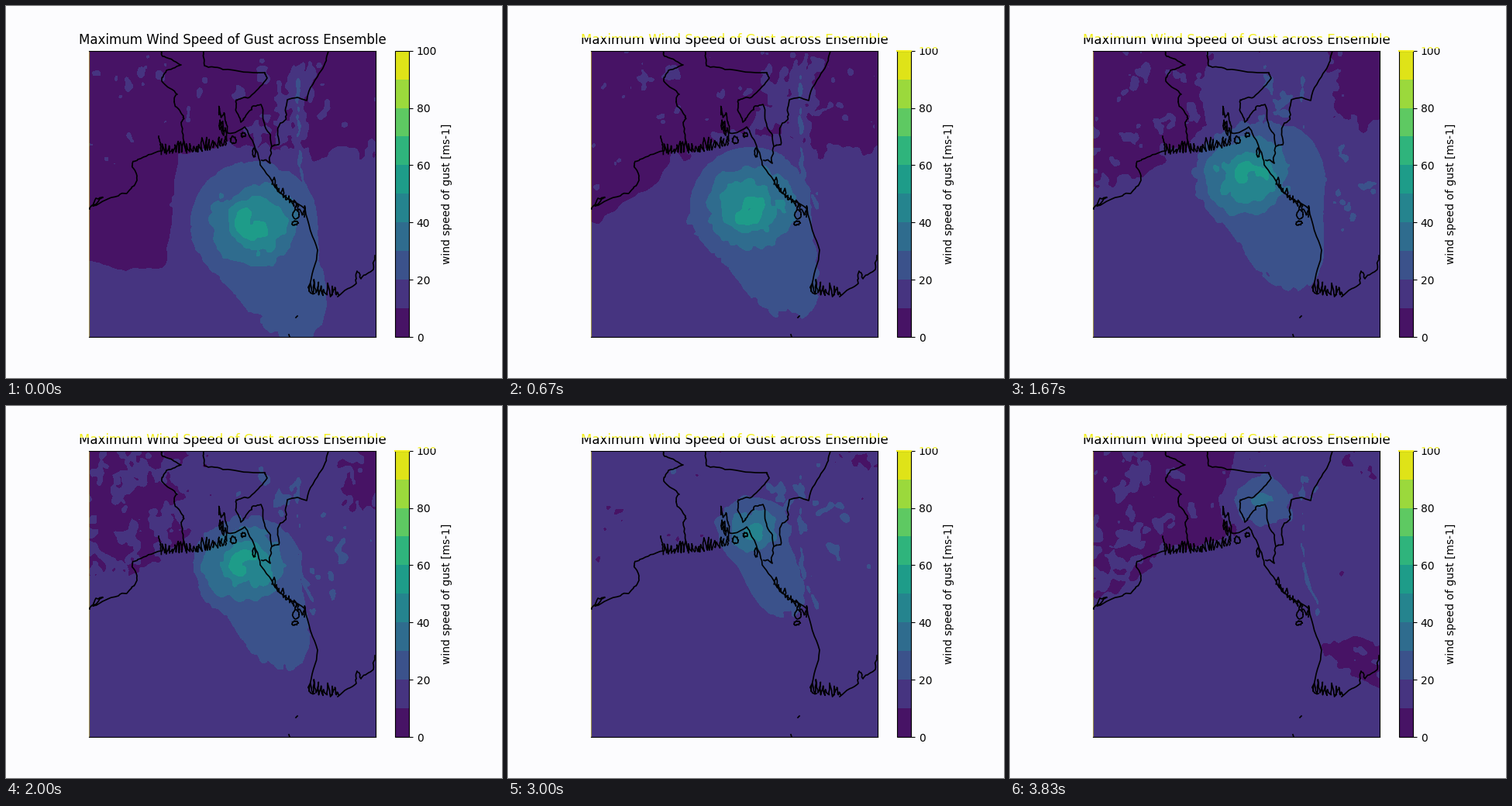
Animation, 640 px wide and 480 px high, one loop 3990 ms. Source, as a matplotlib script:

```python
import numpy as np
import matplotlib.pyplot as plt
from matplotlib.animation import FuncAnimation
from matplotlib.cm import ScalarMappable
from matplotlib.colors import BoundaryNorm, ListedColormap
from matplotlib.patches import Rectangle
from matplotlib.transforms import Bbox

W, H, FRAMES, LOOP_MS = 640, 480, 24, 3990
PAPER, YELLOW = "#fcfcfe", "#f2ee20"
LEFT, RIGHT, TOP, BOTTOM = 107.2, 476.8, 57.6, 427.2
TITLE = "Maximum Wind Speed of Gust across Ensemble"
LEVELS = np.arange(0, 101, 10)
CMAP = ListedColormap(plt.get_cmap("viridis")(np.linspace(.05, .95, 10)))
NORM = BoundaryNorm(LEVELS, 10)
rng = np.random.default_rng(14)

# Map coordinates are stage pixels, y pointing down.
N = 247
X, Y = np.meshgrid(np.linspace(LEFT, RIGHT, N), np.linspace(TOP, BOTTOM, N))


def smooth_noise(sx, sy):
    fx, fy = np.meshgrid(np.fft.fftfreq(N), np.fft.fftfreq(N))
    kernel = np.exp(-2 * np.pi**2 * ((fx * sx)**2 + (fy * sy)**2))
    field = np.fft.ifft2(np.fft.fft2(rng.normal(size=(N, N))) * kernel).real
    return field / field.std()


def step(v):
    return 1 / (1 + np.exp(-np.clip(v, -40, 40)))


def bump(cx, cy, rx, ry):
    return np.exp(-((X - cx) / rx)**2 - ((Y - cy) / ry)**2)


WARP = 5 * smooth_noise(5, 5)
TERRAIN = .6 * smooth_noise(2, 3) + .7 * smooth_noise(5, 6)
GUSTS = [.7 * smooth_noise(1.8, 1.8) + .6 * smooth_noise(4, 4) for _ in range(2)]

COAST_Y = np.interp(X, [108, 165, 205, 300, 320, 390, 402, 478],
                    [258, 225, 190, 165, 200, 265, 320, 370])
LAND = step((COAST_Y - Y) / 6)
RIDGE = X - 376 - 30 * ((Y - 160) / 130)**2 * np.where(Y < 160, .5, 1) + .6 * WARP
RIDGE_SPAN = step((Y - 75) / 8) * step((298 - Y) / 8)


def calm_air(k):
    """Share of still air: a retreating northern front, then a lull over land."""
    early = min(k, 4)
    front = (192 + 148 * np.exp(-k / 9) * step((215 - 10 * early - X) / (3 + 5 * early))
             - 10 * max(k - 6, 0) * (X > 400))
    gap = step((13 * max(k - 4, 0) - np.abs(X + WARP - 333)) / 6) * step((k - 5) * 3)
    northern = .87 * step((front - Y + WARP) / 4) * (1 - gap) * step((13 - k) / 1.2)
    lull = (.62 + .25 * step((X - 185) / 8)) * LAND * step((k - 20.5) / .7)
    lull = lull * (step((292 - X + WARP) / 5) + step((Y - 308 + WARP) / 5))
    pool = 1.1 * bump(197, 230, 31, 29) * np.exp(-((k - 15) / 1.5)**2)
    corner = .58 * bump(448, 72, 34, 28) * step((k - 10) / 2)
    return np.maximum.reduce([northern, lull, pool, corner])


def wind(k):
    u = k / (FRAMES - 1)
    cx = 320 - 14 * np.sin(np.pi * k / 20)
    cy = 282 - 5.5 * k - .065 * k**2
    turn = .45 * k
    noise = .8 * TERRAIN + .7 * (np.cos(turn) * GUSTS[0] + np.sin(turn) * GUSTS[1])

    ridge = RIDGE_SPAN * np.exp(-(RIDGE / 6)**2)
    halo = RIDGE_SPAN * np.exp(-(RIDGE / 18)**2)
    gusty = (.52 * bump(420 + WARP, cy + 5, 58, 65) * np.exp(-((k - 13) / 11)**2)
             + .4 * bump(350 + WARP, 115, 36, 38) * step((k - 2) / 1.5))
    base = 14 - 8 * calm_air(k) * (1 - .7 * halo) + 12 * gusty
    base = np.maximum(base, 14.5 * ridge + 6) + noise * (.35 + 1.4 * LAND)

    dx, dy = X - cx, Y - cy
    angle, dist = np.arctan2(dy, dx), np.hypot(dx / 1.08, dy)
    tail = np.exp(-((angle - np.radians(65)) / .5)**2) * step((20.5 - k) / .7)
    east = np.exp(-((k - 9) / 3)**2) * np.maximum(np.cos(angle), 0)
    reach = 82 - 52 * u**1.3 + 82 * tail + 40 * east
    rho = np.hypot(dx, dy) / reach + .05 * noise
    outer = np.where(rho < 1, 20 + np.minimum(16 * (1 - rho), 5), 20 - 40 * (rho - 1))
    outer += .9 * noise * (rho < 1)

    # The core weakens linearly outward and dies away after landfall.
    peak = 33 + 27 * step((17.5 - k) / 1.8)
    radius = 53 * step((18 - k) / 3)
    core = peak - (peak - 30) * dist / radius
    swirl = np.cos(angle - dist / 6 + .4 * k) * np.exp(-(dist / 36)**2)
    core += (peak - 33) / 27 * (4.5 * swirl - 7 * np.exp(-(dist / 7)**2)) + 1.6 * noise
    return np.clip(np.maximum.reduce([base, outer, core]), 1, 99)


def rough(points, amount=1.6, rounds=3):
    """Subdivide a sketch line, jittering each new point."""
    pts = np.array(points, float)
    for _ in range(rounds):
        mid = (pts[1:] + pts[:-1]) / 2 + rng.normal(0, amount, (len(pts) - 1, 2))
        out = np.empty((len(pts) + len(mid), 2))
        out[::2], out[1::2] = pts, mid
        pts, amount = out, amount / 2
    return pts


def inlets(start, end, count, depth, sag=0):
    """Zigzag of narrow river mouths rising from a base line."""
    s = np.linspace(0, 1, count)
    pts = np.outer(1 - s, start) + np.outer(s, end)
    pts[:, 1] += sag * np.sin(np.pi * s)
    pts += rng.uniform(-1.5, 1.5, pts.shape)
    pts[1::2, 1] -= rng.uniform(.3, 1, len(pts[1::2])) * depth
    return rough(pts, .9, 2)


def island(x, y, rx, ry):
    a = np.linspace(0, 2 * np.pi, 8)
    return rough(np.c_[x + rx * np.cos(a), y + ry * np.sin(a)], .7, 2)


fig = plt.figure(figsize=(W / 100, H / 100), dpi=100, facecolor=PAPER)


def axes_at(x0, x1):
    return fig.add_axes([x0 / W, 1 - BOTTOM / H, (x1 - x0) / W, (BOTTOM - TOP) / H])


ax = axes_at(LEFT, RIGHT)
ax.set(xlim=(LEFT, RIGHT), ylim=(BOTTOM, TOP), xticks=[], yticks=[])
ax.set_title(TITLE)
ax.spines["left"].set(color=YELLOW, alpha=.5)
bar = fig.colorbar(ScalarMappable(NORM, CMAP), cax=axes_at(501.6, 520.08),
                   ticks=range(0, 101, 20), label="wind speed of gust [ms-1]")
bar.minorticks_off()

western_border = [(201, 58), (204, 65), (226, 76), (207, 83), (201, 97), (221, 114),
                  (217, 124), (229, 142), (226, 150), (232, 187)]
northern_border = [(255, 58), (256, 77), (280, 82), (334, 86), (337, 93), (318, 114),
                   (302, 120), (297, 128), (303, 150), (316, 134), (329, 127),
                   (334, 155), (343, 181), (341, 203), (330, 199)]
eastern_border = [(343, 181), (352, 179), (354, 151), (362, 140), (363, 121),
                  (388, 122), (407, 83), (416, 58)]
western_coast = [(108, 262), (116, 248), (125, 247), (112, 258), (145, 245),
                 (162, 235), (169, 225), (163, 208), (170, 198), (200, 187), (197, 168)]
eastern_coast = [(284, 150), (286, 164), (308, 156), (319, 176), (328, 205), (352, 240),
                 (386, 262), (402, 315), (391, 366), (398, 371)]
southern_coast = [(428, 375), (452, 358), (453, 342), (458, 352), (474, 340), (476, 322)]

lines = [rough(p) for p in (western_border, northern_border, eastern_border,
                            western_coast, eastern_coast, southern_coast)]
lines += [
    inlets((200, 190), (284, 180), 43, 16, sag=3),
    inlets((275, 153), (284, 173), 9, 20),
    inlets((274, 140), (282, 150), 5, 12),
    inlets((343, 231), (386, 272), 23, 11),
    inlets((392, 368), (430, 374), 19, 17, sag=2),
    island(374, 269, 4, 6), island(373, 280, 4, 3), island(306, 166, 3, 3),
    island(320, 189, 2, 6), island(293, 173, 4, 5),
    np.array([(374, 402), (376, 400)]), np.array([(365, 424), (366, 427)]),
]
for line in lines:
    ax.plot(*line.T, color="black", lw=1.2, zorder=3)


def strip(x0, y0, x1, y1, color):
    return fig.add_artist(Rectangle((x0 / W, 1 - y1 / H), (x1 - x0) / W, (y1 - y0) / H,
                                    transform=fig.transFigure, color=color, lw=0, zorder=8))


def yellow_top(x, y, text, box, **style):
    """Yellow upper part of a label, with paper colour behind it."""
    x0, y0, x1, y1 = box
    label = fig.text(x / W, 1 - y / H, text, color=YELLOW, zorder=9, **style)
    label.set_clip_box(Bbox.from_extents(x0, H - y1, x1, H - y0))
    label.set_clip_on(True)
    return [strip(*box, PAPER), label]


POINT = 100 / 72
tinted = [strip(501, 57, 521, 58.5, YELLOW)]
tinted += yellow_top((LEFT + RIGHT) / 2, TOP - 6 * POINT, TITLE, (90, 33, 495, 41),
                     size=12, ha="center", va="baseline")
tinted += yellow_top(520.08 + 7 * POINT, TOP, "100", (527, 50, 558, 55),
                     size=10, ha="left", va="center_baseline")
contours = []


def draw(k):
    while contours:
        contours.pop().remove()
    contours.append(ax.contourf(X, Y, wind(k), LEVELS, cmap=CMAP, norm=NORM, zorder=0))
    for artist in tinted:
        artist.set_visible(k > 0)
    return contours + tinted


animation = FuncAnimation(fig, draw, frames=FRAMES, interval=LOOP_MS / FRAMES,
                          repeat=True, repeat_delay=0, blit=False)
plt.show()
```
